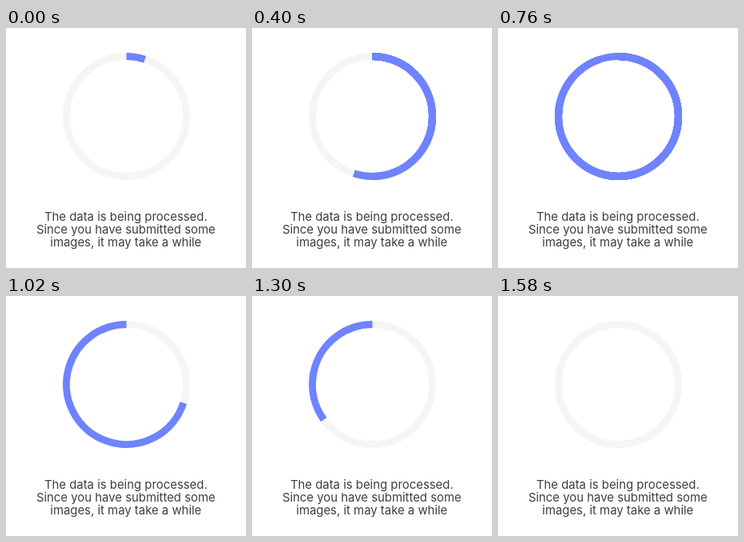
Recreate the animation shown at these times as an HTML page with a canvas. Size 300 by 300 pixels, loop 1640 ms.

```html
<!DOCTYPE html>
<html lang="en">
<head>
<meta charset="utf-8">
<title>Processing</title>
<style>
  html, body { margin: 0; width: 100%; height: 100%; overflow: hidden; background: #fff; }
  canvas, svg { position: absolute; top: 0; left: 0; width: 100vw; height: 100vh; }
  text { font: 14.9px Inter, sans-serif; fill: #3e3e3e; text-anchor: middle; }
</style>
</head>
<body>
<canvas width="300" height="300"></canvas>
<svg viewBox="0 0 300 300">
  <text x="149.8" y="240.5">The data is being processed.</text>
  <text x="149.8" y="256.8">Since you have submitted some</text>
  <text x="149.8" y="273.2">images, it may take a while</text>
</svg>
<script>
  const LOOP = 1640, HALF = 820, STEP = 40, STEPS = 20;
  const ctx = document.querySelector('canvas').getContext('2d');
  const stepsAt = t => Math.max(0, Math.min(STEPS, Math.floor(t / STEP) + 1));
  const angle = step => (step / STEPS) * 2 * Math.PI - Math.PI / 2;

  function arc(from, to, color) {
    ctx.beginPath();
    ctx.arc(150.5, 110.5, 75, angle(from), angle(to));
    ctx.strokeStyle = color;
    ctx.stroke();
  }

  // The head fills the ring in the first half, the tail empties it in the second.
  function draw() {
    const t = performance.now() % LOOP;
    const head = stepsAt(t), tail = stepsAt(t - HALF);
    ctx.clearRect(0, 0, 300, 300);
    ctx.lineWidth = 9;
    arc(0, STEPS, '#f5f5f5');
    // While filling, each step is painted over the last, which hardens the edges.
    for (let end = tail ? head : 1; end <= head; end++) {
      if (end > tail) arc(tail, end, '#6f83ff');
    }
    requestAnimationFrame(draw);
  }
  draw();
</script>
</body>
</html>
```
